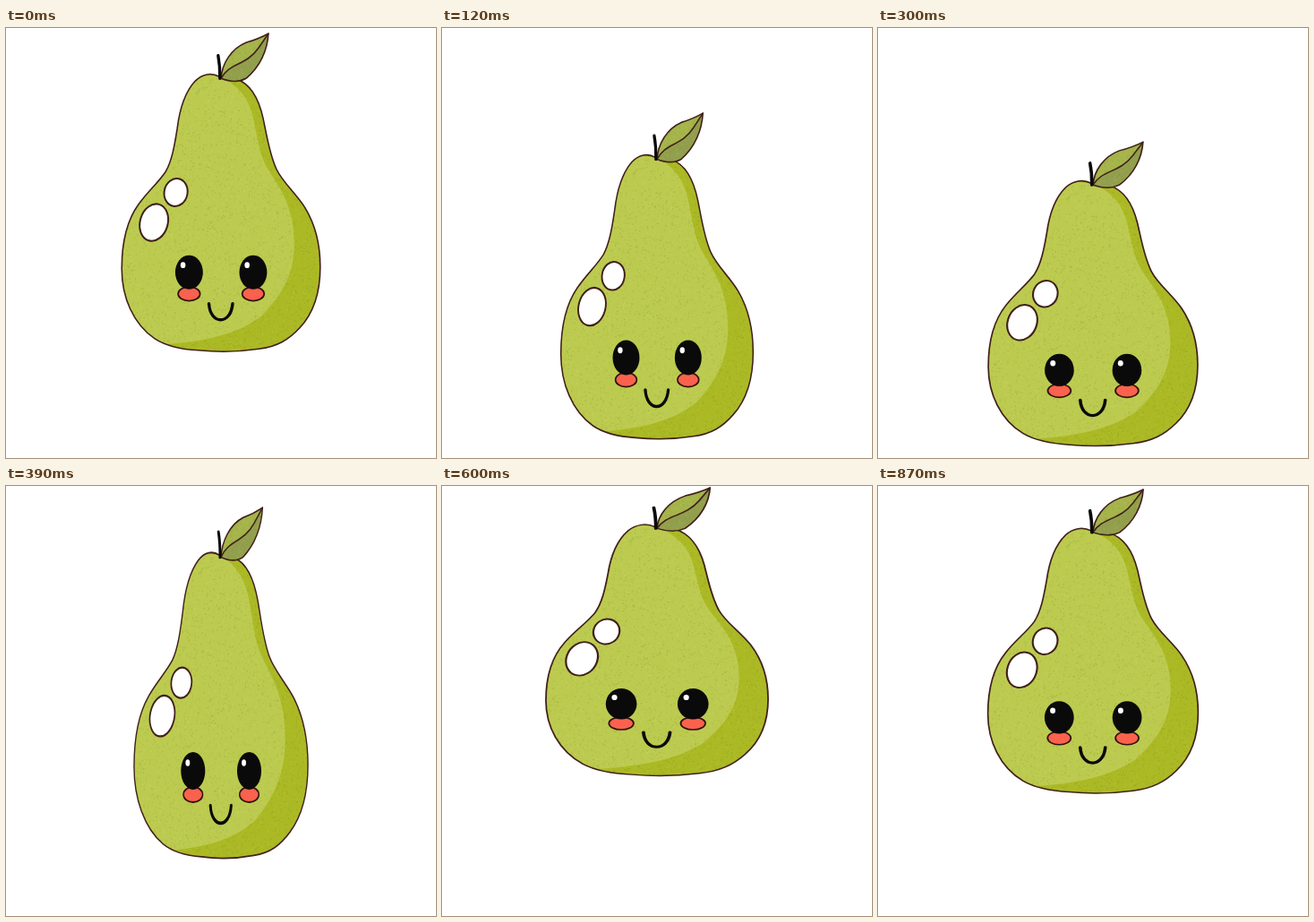
An HTML page with a canvas that plays this animation: 480x480 px, repeating every 0.9 s.

```html
<!DOCTYPE html>
<html>
<head>
<meta charset="utf-8">
<style>
  html, body { margin: 0; height: 100%; overflow: hidden; background: #fff; }
  canvas { display: block; width: 480px; height: 480px; }
</style>
</head>
<body>
<canvas id="stage" width="480" height="480"></canvas>
<script>
const ctx = document.getElementById('stage').getContext('2d');
const LOOP = 900, APEX = 675;
const INK = '#0b0a0a', OUTLINE = '#40201a';

// Bounce, mirrored around the apex: [ms from apex, width, top, bottom]
const KEYS = [
  [0, 249, 1.5, 322.5], [75, 248, 2, 324], [165, 242, 3, 331],
  [195, 235, 4, 343], [225, 222, 6, 361], [285, 194, 25, 417],
  [345, 214, 94, 459], [435, 280, 194, 475], [450, 281, 196, 475.5],
];

// The pear at rest is 222 wide and spans y 6 to 361.
const body = new Path2D(`M238 54 C229 49 219 51 211 59 C198 73 193 96 191 112
  C188 131 185 148 178 160 C170 172 158 182 148 196 C134 215 129 240 129 268
  C129 300 142 330 166 346 C180 355 198 358 215 359 C240 361.5 262 360.5 282 357.5
  C303 355 316 347 328 334 C344 317 351 292 351 266 C351 240 345 218 334 200
  C324 184 309 172 302 157 C294 140 291 118 287 100 C282 78 272 62 258 57
  Q247 54 238 54Z`);
const litSide = new Path2D(`M100 40 L238 54 C262 64 272 82 276 100
  C281 122 283 142 293 158 C306 178 322 200 322 240 C322 272 310 296 285 321
  C258 341 225 349 170 353 L100 370Z`);
const leaf = new Path2D(`M240 56 C241 40 251 23 268 16 Q282 12 293 6
  C292 24 284 43 268 56 C259 61 248 59 240 56Z`);
const leafUnder = new Path2D(`M240 56 C250 38 268 42 282 22 L293 6
  C292 24 284 43 268 56 C259 61 248 59 240 56Z`);
const rib = new Path2D('M240 56 C250 38 268 42 282 22 L293 6');
const stem = new Path2D('M238.8 56 Q239 42 236.8 30.5');
const smile = new Path2D('M226.5 307 C228 331 251 331 253 307');

let seed = 7;
const random = () => (seed = seed * 16807 % 2147483647) / 2147483647;

function makeGrain(count) {
  const path = new Path2D();
  for (let i = 0; i < count; i++) {
    path.rect(125 + random() * 230, random() * 362, 0.5 + random() * 1.2, 0.5 + random() * 1.5);
  }
  return path;
}
const darkGrain = makeGrain(4200), lightGrain = makeGrain(2600);

function fill(path, color) {
  ctx.fillStyle = color;
  ctx.fill(path);
}

function stroke(path, color, width) {
  ctx.strokeStyle = color;
  ctx.lineWidth = width;
  ctx.stroke(path);
}

function oval(x, y, rx, ry, color, line, width, tilt = 0) {
  const path = new Path2D();
  path.ellipse(x, y, rx, ry, tilt, 0, 7);
  fill(path, color);
  if (line) stroke(path, line, width);
}

function textured(path, paint) {
  ctx.save();
  ctx.clip(path);
  paint();
  fill(darkGrain, 'rgba(95,105,10,.17)');
  fill(lightGrain, 'rgba(225,235,140,.13)');
  ctx.restore();
  stroke(path, OUTLINE, 1.6);
}

function slope(i, c) {
  const a = KEYS[i - 1], b = KEYS[i + 1];
  return a && b ? (b[c] - a[c]) / (b[0] - a[0]) : 0;
}

function pose(time) {
  const away = Math.abs(time - APEX), d = Math.min(away, LOOP - away);
  let i = 0;
  while (i < KEYS.length - 2 && d > KEYS[i + 1][0]) i++;
  const a = KEYS[i], b = KEYS[i + 1], span = b[0] - a[0];
  const u = (d - a[0]) / span, ease = u * u * (3 - 2 * u);
  return [1, 2, 3].map(c => a[c] + (b[c] - a[c]) * ease +
    span * u * (1 - u) * (slope(i, c) * (1 - u) - slope(i + 1, c) * u));
}

function drawPear() {
  textured(body, () => {
    fill(body, '#abb925');
    fill(litSide, '#bccb50');
  });
  textured(leaf, () => {
    fill(leaf, '#a5b44b');
    fill(leafUnder, '#929f4d');
  });
  stroke(rib, OUTLINE, 1.6);
  stroke(stem, INK, 3.4);

  oval(189.5, 183, 13, 15.5, '#fff', OUTLINE, 2, 0.2);
  oval(165, 216.5, 15.5, 21, '#fff', OUTLINE, 2, 0.28);

  for (const x of [204.3, 276]) {
    oval(x, 296, 12.3, 7.8, '#fa624d', '#30130f', 1.7);
    oval(x, 272, 15.5, 19, INK);
    oval(x - 6.8, 264, 2.8, 3.4, '#fff');
  }
  stroke(smile, INK, 3.4);
}

function frame(now) {
  const [width, top, bottom] = pose(now % LOOP);
  const sx = width / 222, sy = (bottom - top) / 355;
  ctx.setTransform(1, 0, 0, 1, 0, 0);
  ctx.clearRect(0, 0, 480, 480);
  ctx.setTransform(sx, 0, 0, sy, 240 - 240 * sx, top - 6 * sy);
  ctx.lineCap = ctx.lineJoin = 'round';
  drawPear();
}

const start = performance.now();
function tick() {
  frame(performance.now() - start);
  requestAnimationFrame(tick);
}
tick();
</script>
</body>
</html>
```
